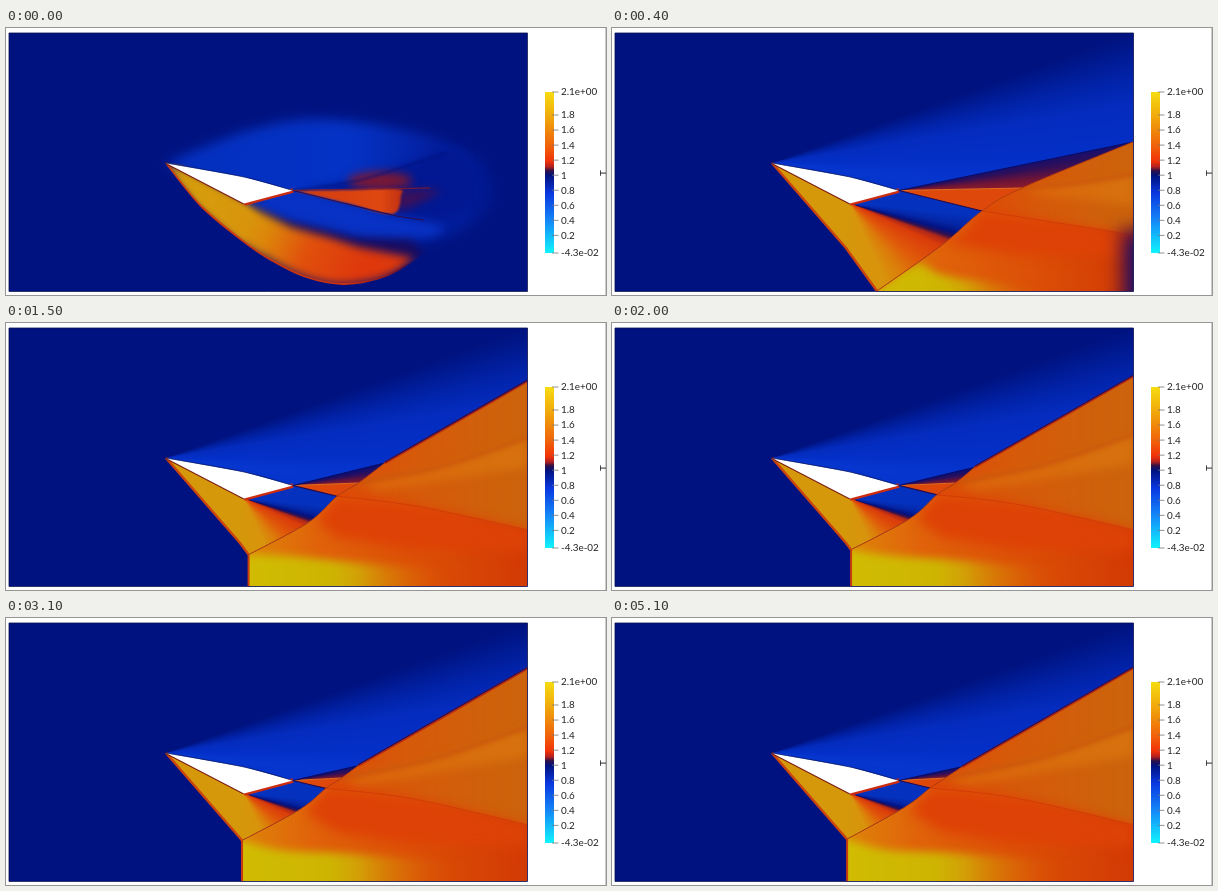
Write an HTML page with a canvas that moves like this. It is 600 px wide and 267 px high and loops after 5200 ms.

```html
<!DOCTYPE html>
<html lang="en">
<head>
<meta charset="utf-8">
<title>Supersonic wedge, temperature</title>
<style>
html, body { margin: 0; width: 100%; height: 100%; overflow: hidden; background: #fff; }
canvas, svg { position: absolute; left: 0; top: 0; display: block; }
text { font: 9.9px Lato, "Open Sans", sans-serif; fill: #222; }
</style>
</head>
<body>
<canvas id="flow" width="600" height="267"></canvas>
<svg id="legend" width="600" height="267" viewBox="0 0 600 267">
  <defs>
    <linearGradient id="scale" x1="0" y1="0" x2="0" y2="1">
      <stop offset="0" stop-color="#f6dc10"/>
      <stop offset=".16" stop-color="#f0a60c"/>
      <stop offset=".34" stop-color="#f0600a"/>
      <stop offset=".43" stop-color="#f23208"/>
      <stop offset=".465" stop-color="#b02020"/>
      <stop offset=".49" stop-color="#2c1048"/>
      <stop offset=".52" stop-color="#00127f"/>
      <stop offset=".63" stop-color="#0a38e0"/>
      <stop offset=".8" stop-color="#1488f8"/>
      <stop offset="1" stop-color="#10f4fc"/>
    </linearGradient>
  </defs>
  <rect x="539" y="64" width="9" height="161" fill="url(#scale)"/>
  <path d="M599.5 0V267" stroke="#ccc"/>
  <text transform="translate(600.5 145) rotate(-90)" text-anchor="middle">T</text>
</svg>
<script>
const LOOP = 5200, STEP = 100, SETTLED = 400;
const L = 3, T = 5, R = 521.5, B = 263.5;
const NAVY = '#00127f';
const NOSE = [160, 135], BACK = [238, 149], TAIL = [287, 162.5], KEEL = [238, 175.5];
const BOW_KINK = [234, 220];
// outline of the starting cloud: upper edge, then the curved bow shock
const CLOUD = [NOSE, [238, 104], [310, 91], [400, 102], [466, 126], [488, 160], [470, 194], [420, 214]];
const BOW = [NOSE, [195, 178], [237, 213], [265, 232], [300, 249], [338, 256], [380, 248], [418, 226]];

const ctx = document.getElementById('flow').getContext('2d');

// The reflected shock relaxes exponentially towards its steady place
function stateAt(t) {
  const e = Math.exp((SETTLED - t) / 800);
  const relax = (rest, shift, power = 1) => rest + shift * e ** power;
  return {
    stem: [relax(235, 30), relax(221, 42)],
    bend: [relax(293, 37), relax(188.5, 28.5, .7)],
    shear: [relax(318, 52), relax(170, 13)],
    slip: [relax(333, 77), 160],
    join: [relax(350, 171, 1.3), relax(149, -35)],
    outY: relax(50, 64, 1.5),
    streakY: relax(108, 38, 1.3),
    hot: [relax(232, 4), relax(235, 14), relax(246, 22)],
    hotX: relax(338, -18),
    coldX: 390 + t * .25
  };
}

// Catmull-Rom spline appended to a path
function spline(path, pts) {
  path.lineTo(...pts[0]);
  for (let i = 0; i < pts.length - 1; i++) {
    const b = pts[i], c = pts[i + 1], a = pts[i - 1] || b, d = pts[i + 2] || c;
    path.bezierCurveTo(
      b[0] + (c[0] - a[0]) / 6, b[1] + (c[1] - a[1]) / 6,
      c[0] - (d[0] - b[0]) / 6, c[1] - (d[1] - b[1]) / 6, ...c);
  }
  return path;
}

function poly(...pts) {
  const path = new Path2D();
  pts.forEach(p => path.lineTo(...p));
  path.closePath();
  return path;
}

function smooth(pts, ...rest) {
  const path = spline(new Path2D(), pts);
  rest.forEach(p => path.lineTo(...p));
  return path;
}

function ellipse(...box) {
  const path = new Path2D();
  path.ellipse(...box, 0, 0, 2 * Math.PI);
  return path;
}

function stops(g, list) {
  list.forEach(([at, color]) => g.addColorStop(at, color));
  return g;
}

const linear = (x0, y0, x1, y1, ...list) => stops(ctx.createLinearGradient(x0, y0, x1, y1), list);

// Colours by angle in degrees around a corner, starting at -60
function fan([x, y], ...list) {
  const g = ctx.createConicGradient(-Math.PI / 3, x, y);
  return stops(g, list.map(([deg, c]) => [(deg + 60) / 360, c]));
}

function fill(path, style, blur = 0) {
  ctx.filter = blur ? `blur(${blur}px)` : 'none';
  ctx.fillStyle = style;
  ctx.fill(path);
  ctx.filter = 'none';
}

function line(path, style, width = 1, blur = 0) {
  ctx.filter = blur ? `blur(${blur}px)` : 'none';
  ctx.strokeStyle = style;
  ctx.lineWidth = width;
  ctx.stroke(path);
  ctx.filter = 'none';
}

function within(path, draw) {
  ctx.save();
  ctx.clip(path);
  draw();
  ctx.restore();
}

function body() {
  line(poly(NOSE, KEEL), '#7a1c10', 2);
  line(poly(KEEL, TAIL), '#cc2c10', 4.5);
  fill(poly(NOSE, BACK, TAIL, KEEL), '#fff');
  line(smooth([NOSE, BACK, TAIL]), '#0a1660', .7);
}

function startup() {
  fill(smooth([...CLOUD, [340, 214], KEEL]),
    linear(200, 0, 492, 0, [0, '#0430c0'], [.5, '#0432c4'], [.75, '#0422a4'], [1, '#00168c']), 6);
  fill(smooth([[300, 162], [360, 150], [400, 137], [448, 122], [470, 160], [446, 190], [390, 186]]), '#021892', 5);
  fill(smooth([KEEL, [290, 167], [340, 178], [390, 190], [436, 199], [420, 208], [360, 208], [290, 195]]),
    '#0832c4', 4);

  within(smooth(BOW, [440, 200], [440, 140], [240, 140]), () => {
    fill(smooth(BOW, [405, 212], [350, 209], [318, 201], [280, 193], KEEL), '#180c60', 5);
    fill(smooth([...BOW.slice(0, 7), [408, 230]], [352, 219], [325, 210], [285, 199], KEEL),
      linear(215, 190, 350, 250, [0, '#d8980c'], [.3, '#dc8c0a'], [.62, '#e0500c'], [1, '#de380c']), 4);
    fill(poly(NOSE, BOW[1], BOW[2], BOW[3], [258, 198], KEEL),
      linear(190, 170, 270, 215, [0, '#d69c0c'], [.65, '#d8940c'], [1, '#de780c00']), 3);
  });
  line(smooth(BOW), linear(160, 0, 420, 0, [0, '#d04010'], [.7, '#c83010'], [.9, '#701430'], [1, '#00127f00']), 1.8);

  fill(ellipse(374, 153, 32, 9), '#7a1834', 5);
  fill(smooth([[390, 163], [418, 162], [434, 163], [415, 174], [392, 184]]), '#3c1058', 4);
  fill(smooth([TAIL, [340, 162], [391, 161], [395, 168], [386, 186], [340, 175], TAIL]),
    linear(290, 0, 396, 0, [0, '#d03c10'], [.8, '#e04810'], [1, '#c03014']), 1);
  line(smooth([TAIL, [325, 172], [386, 187], [418, 192]]), '#280c54', 1.2);
  line(smooth([TAIL, [350, 153], [400, 138], [440, 125]]), '#00107a', 1.2, .8);
  line(smooth([TAIL, [360, 161], [424, 160]]), '#801c2c');
}

function downstream(s) {
  const front = [s.stem, s.bend, s.shear, s.slip, s.join];
  const region = smooth(front, [R, s.outY], [R, B], [s.stem[0], B]);
  const [sx, sy] = s.stem, [px, py] = s.shear, [qx, qy] = s.slip;
  const shearLine = [s.shear, [px + (R - px) * .42, py + 10], [R, 207]];
  const streak = [s.slip, [qx + (R - qx) * .5, qy + (s.streakY - qy) * .38], [R, s.streakY]];

  within(region, () => {
    fill(region, linear(sx, 0, R, 0, [0, '#de840a'], [.25, '#e0620a'], [.6, '#dc5007'], [1, '#d23a04']));
    // layer above the shear line
    fill(smooth(shearLine, [R, 0], [qx, 0], [px, py - 12]),
      linear(px, 0, R, 0, [0, '#de4c08'], [.4, '#d65a0a'], [1, '#cc640c']), 1);
    fill(smooth(streak, [R, s.streakY + 30], [qx + 20, qy + 8]),
      linear(qx, 0, R, 0, [0, '#dc660c'], [1, '#d6720e']), 5);
    line(smooth(streak), '#c8540c', 3, 2);
    // red belt below the shear line
    fill(smooth(shearLine, [R, 228], [400, 226], [330, 214], [px - 20, py + 24]), '#de4206', 6);
    line(smooth(shearLine), '#d23c08', 1, .5);
    // hot zone behind the stem
    fill(smooth([s.stem, [sx + 40, s.hot[0]], [340, s.hot[1]], [480, s.hot[2]]], [510, B + 12], [sx - 8, B + 12], [sx - 8, sy]),
      linear(sx, 0, s.hotX + 110, 0, [0, '#d0bc02'], [.42, '#ceb402'], [.55, '#d2a006'], [1, '#dc5c0600']), 4);
    // cold patch drifting out through the outlet
    fill(poly([s.coldX + 18, 200], [700, 200], [700, 300], [s.coldX + 18, 300]), '#601438', 9);
    fill(poly([s.coldX + 30, 212], [700, 206], [700, 300], [s.coldX + 30, 300]), '#0a1078', 8);
  });

  line(smooth(front), '#b43c0e');
  line(smooth([s.join, [R, s.outY]]), '#b82c12', 2.4);
  line(smooth([[s.join[0], s.join[1] - 1], [R, s.outY - 1]]), '#2c0c50', 1.2);
  line(smooth([s.stem, [sx, B]]), '#c83c10', 2);
}

function developed(s) {
  // expansion over the upper face
  fill(poly(NOSE, [R, 0], [R, s.outY], s.join, TAIL, BACK),
    fan(NOSE, [-60, NAVY], [-20, NAVY], [-17, '#001a92'], [-13, '#0224ac'], [-9, '#042cbe'],
      [0, '#0430c8'], [6, '#0636ce'], [20, '#0432ca'], [300, NAVY]));

  // compressed layer and corner expansion under the wedge
  const lower = new Path2D();
  lower.moveTo(...NOSE);
  lower.lineTo(...BOW_KINK);
  spline(lower, [s.stem, s.bend, s.shear]);
  lower.lineTo(...TAIL);
  lower.lineTo(...KEEL);
  fill(lower, fan(KEEL, [-60, '#0432be'], [5, '#0432be'], [11, '#0426a6'], [15.5, '#041280'],
    [18, '#34104c'], [20.5, '#b02818'], [25, '#da3c0a'], [40, '#e0580a'], [53, '#dc7c0a'],
    [66, '#d8940c'], [100, '#d4980a'], [240, '#d4980a'], [300, '#0432be']));

  // wake between the trailing shocks
  const wake = poly(TAIL, s.join, s.slip);
  fill(wake, fan(TAIL, [-60, NAVY], [-13, '#0c0e74'], [-9, '#300f58'], [-5, '#6c1438'], [0, '#981c26'], [300, NAVY]));
  fill(poly(TAIL, s.slip, s.shear), '#de480a');
  line(smooth([TAIL, s.slip]), '#de7020');
  line(smooth([TAIL, s.join]), '#0c0c66', 1.2);
  line(smooth([TAIL, s.shear]), '#240c50', 1.2);

  downstream(s);
  line(smooth([NOSE, BOW_KINK, s.stem].slice(0, 2), s.stem), '#cc440c', 2.4, .4);
}

// Keep only what the growing cloud has reached
function reach(k) {
  const grow = pts => pts.map(p => p.map((v, i) => NOSE[i] + (v - NOSE[i]) * k));
  ctx.globalCompositeOperation = 'destination-in';
  fill(smooth(grow([...CLOUD, ...BOW.slice().reverse()])), '#000', 5 * k);
  ctx.globalCompositeOperation = 'source-over';
}

function draw(t) {
  const frame = new Path2D();
  frame.rect(L, T, R - L, B - T);
  ctx.clearRect(0, 0, 600, 267);
  within(frame, () => {
    if (t < STEP) startup(); else developed(stateAt(t));
    if (t >= STEP && t < SETTLED) reach(1 + t / 300);
    ctx.globalCompositeOperation = 'destination-over';
    fill(frame, NAVY);
    ctx.globalCompositeOperation = 'source-over';
    body();
  });
  line(frame, '#0a1050', .8);
}

function legend() {
  const svg = document.getElementById('legend');
  const add = (name, attrs, text = '') => {
    const el = document.createElementNS('http://www.w3.org/2000/svg', name);
    for (const k in attrs) el.setAttribute(k, attrs[k]);
    el.textContent = text;
    svg.append(el);
  };
  const mark = (y, label) => {
    add('path', { d: `M546 ${y}h6.5`, stroke: '#777', 'stroke-width': .8 });
    add('text', { x: 555, y: y + 3.4 }, label);
  };
  mark(64, '2.1e+00');
  for (let i = 0; i < 9; i++) mark(87 + i * 15.05, String((18 - 2 * i) / 10));
  mark(225, '-4.3e-02');
}

legend();
let shown = -1;
const start = performance.now();
function tick() {
  const t = Math.floor((performance.now() - start) % LOOP / STEP) * STEP;
  if (t !== shown) draw(shown = t);
  requestAnimationFrame(tick);
}
tick();
</script>
</body>
</html>
```
